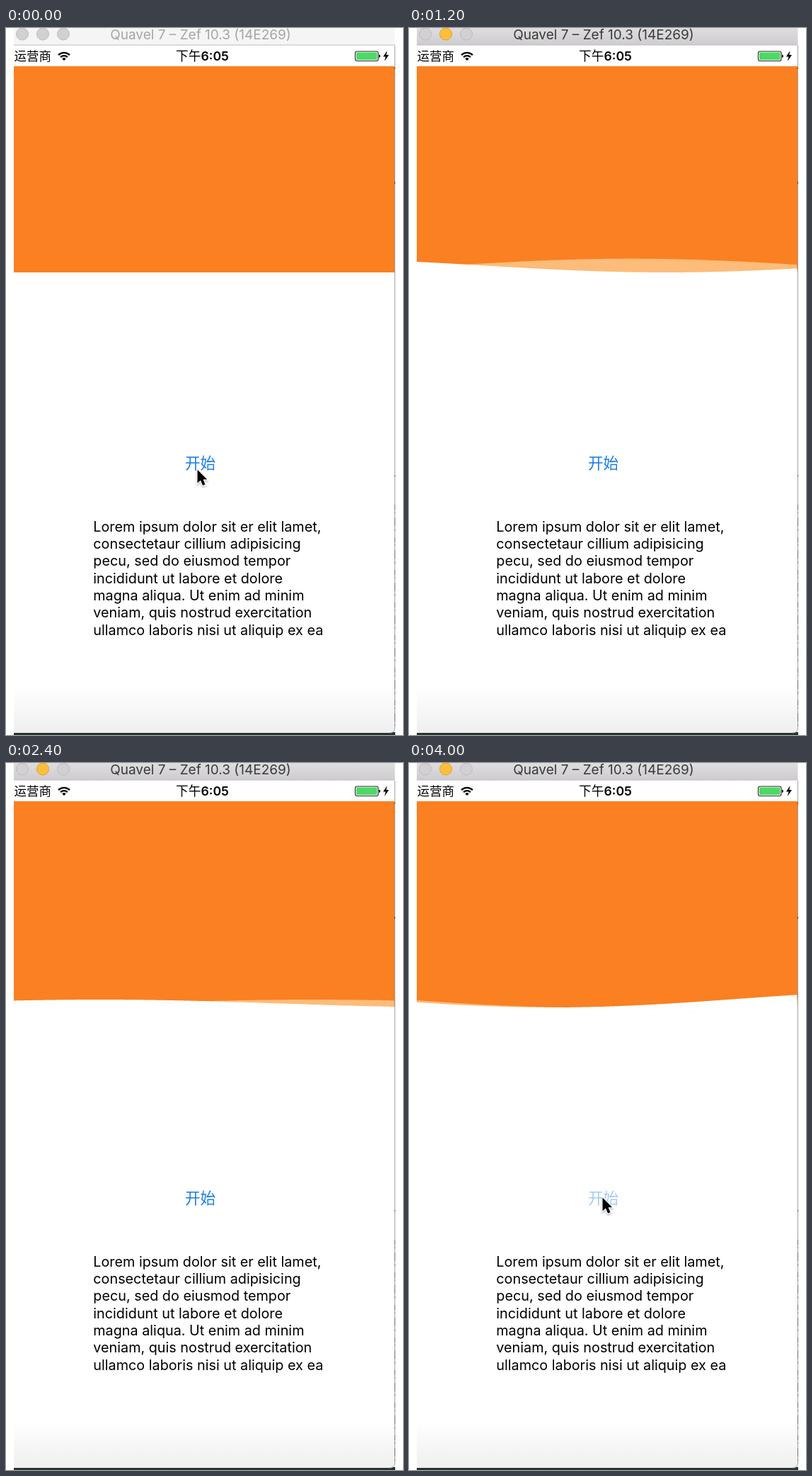
Write an HTML page that moves like this. It is 561 px wide and 998 px high and loops after 4.4 s.

```html
<!DOCTYPE html>
<html lang="zh">
<head>
<meta charset="utf-8">
<title>Wave header</title>
<style>
  html, body { margin: 0; width: 100%; height: 100%; overflow: hidden; background: #fff; }
  svg { display: block; width: 561px; height: 998px; }
  text { font-family: Inter, "Noto Sans CJK SC", "Noto Sans CJK", sans-serif; white-space: pre; }
</style>
</head>
<body>
<svg viewBox="0 0 561 998" xmlns="http://www.w3.org/2000/svg">
  <defs>
    <linearGradient id="bar" x1="0" y1="0" x2="0" y2="1">
      <stop offset="0" stop-color="#dfdddf"/><stop offset="1" stop-color="#cecccf"/>
    </linearGradient>
    <linearGradient id="fade" x1="0" y1="0" x2="0" y2="1">
      <stop offset="0" stop-color="#fff"/><stop offset="1" stop-color="#efefef"/>
    </linearGradient>
    <filter id="shadow" x="-50%" y="-50%" width="200%" height="200%">
      <feDropShadow dx="0" dy="1.5" stdDeviation="1.3" flood-opacity=".35"/>
    </filter>
  </defs>

  <!-- window -->
  <rect x="11" y="994" width="539" height="4" fill="#26352f"/>
  <path d="M11 24H549.5V988Q549.5 995 542 995H11Z" fill="#fff"/>
  <path d="M11 930H549.5V988Q549.5 995 542 995H11Z" fill="url(#fade)"/>
  <rect id="titleBar" x="11" y="0" width="538.5" height="24"/>
  <rect x="11" y="23.5" width="538.5" height="1" fill="#bdbdbd"/>
  <g stroke="#bcbabc" stroke-width="1" fill="#d2d0d2">
    <circle cx="23" cy="8.5" r="8.5"/>
    <circle id="amber" cx="52" cy="8.5" r="8.5"/>
    <circle cx="81" cy="8.5" r="8.5"/>
  </g>
  <text id="title" x="275" y="16" font-size="19" text-anchor="middle">Quavel 7 – Zef 10.3 (14E269)</text>

  <!-- status bar -->
  <text x="11.5" y="46" font-size="17.5">运营商</text>
  <g fill="none" stroke="#000" stroke-width="2.3" transform="translate(.5 0)">
    <path d="M73.6 38.1A11.2 11.2 0 0 1 89.4 38.1"/>
    <path d="M76.6 41.1A7 7 0 0 1 86.4 41.1"/>
    <path d="M81.5 46L78.9 43.4A3.7 3.7 0 0 1 84.1 43.4Z" fill="#000" stroke="none"/>
  </g>
  <text x="277.5" y="46" font-size="17.7" font-weight="600" text-anchor="middle"><tspan font-weight="500">下午</tspan>6:05</text>
  <rect x="493.5" y="33" width="32.5" height="13.5" rx="2.5" fill="#fff" stroke="#222" stroke-width="1.1"/>
  <rect x="495" y="34.5" width="29.5" height="10.5" rx="1.3" fill="#4cd964"/>
  <path d="M527 37.5Q529 38 529 39.8T527 42Z"/>
  <path d="M538.5 32L533 40.5H536.5L534.8 47L541 38H537.3Z"/>

  <!-- header and waves -->
  <rect x="11" y="54" width="538" height="291" fill="#fa8022"/>
  <path id="back" fill="#fdbc79"/>
  <path id="front" fill="#fff"/>
  <path d="M549.5 25V988Q549.5 995 542 995" fill="none" stroke="#a2a2a2"/>
  <path d="M549.5 673V985" stroke="#6d6d6d" stroke-dasharray="7 3 2 6 12 4 3 9"/>
  <path d="M549.5 56v2M549.5 217v3M549.5 631v2" stroke="#444"/>

  <text id="button" x="253" y="622" font-size="21.6">开始</text>
  <g id="lorem" font-size="19.8"></g>
  <path id="cursor" d="M.5 1.5V20.5L4.9 16.5L8.1 23.8L11.5 22.3L8.5 15.3H14.2Z" fill="#000" stroke="#fff"
        stroke-width="2.2" paint-order="stroke" filter="url(#shadow)"/>
</svg>

<script>
const STEP = 400, LOOP = 4400;
const LEFT = 11, RIGHT = 549, BASE = 345, LENGTH = 1030;
const $ = id => document.getElementById(id);
const set = (id, attrs) => {
  for (const key in attrs) $(id).setAttribute(key, attrs[key]);
};

const lines = [
  "Lorem ipsum dolor sit er elit lamet,",
  "consectetaur cillium adipisicing",
  "pecu, sed do eiusmod tempor",
  "incididunt ut labore et dolore",
  "magna aliqua. Ut enim ad minim",
  "veniam, quis nostrud exercitation",
  "ullamco laboris nisi ut aliquip ex ea"
];
$("lorem").innerHTML = lines.map((line, i) =>
  `<text x="123.3" y="${(710.8 + i * 24.3).toFixed(1)}">${line}</text>`).join("");

// pointer tip by step; it is off the stage at the others
const pointer = {
  0: [270, 622], 1: [274, 610], 2: [126, 331],
  8: [244, 632], 9: [273, 614], 10: [273, 612]
};

// the curve stops just short of the right edge and drops to the corner
function wave(crest, amp) {
  let d = `M${LEFT} ${BASE + 1}`;
  for (let x = LEFT; x < RIGHT; x += 1.5) {
    const y = BASE - amp * (1 + Math.cos((x - crest) * 2 * Math.PI / LENGTH));
    d += `L${x} ${y.toFixed(2)}`;
  }
  return d + `L${RIGHT} ${BASE}V${BASE + 1}Z`;
}

function draw(time) {
  const n = Math.floor(time % LOOP / STEP);
  const active = n > 1;

  set("titleBar", { fill: active ? "url(#bar)" : "#f5f5f5" });
  set("title", { fill: active ? "#3a3a3a" : "#a5a5a5" });
  set("amber", active ? { fill: "#fdbe3c", stroke: "#dfa02f" } : { fill: "#d2d0d2", stroke: "#bcbabc" });
  set("button", { fill: n === 10 ? "#a5cdf0" : "#1b7fe3" });

  // the front wave runs at twice the speed of the back one, both die down;
  // the last step is just after the second tap
  const k = n === 10 ? -0.47 : n - 2;
  const amp = 11.1 - 1.4 * k;
  set("front", { d: active ? wave(440 - 592 * k, amp) : "" });
  set("back", { d: active ? wave(616 - 303 * k, amp) : "" });

  const tip = pointer[n];
  set("cursor", tip
    ? { transform: `translate(${tip})`, visibility: "visible" }
    : { visibility: "hidden" });
}

function tick() {
  draw(performance.now());
  requestAnimationFrame(tick);
}
tick();
</script>
</body>
</html>
```
